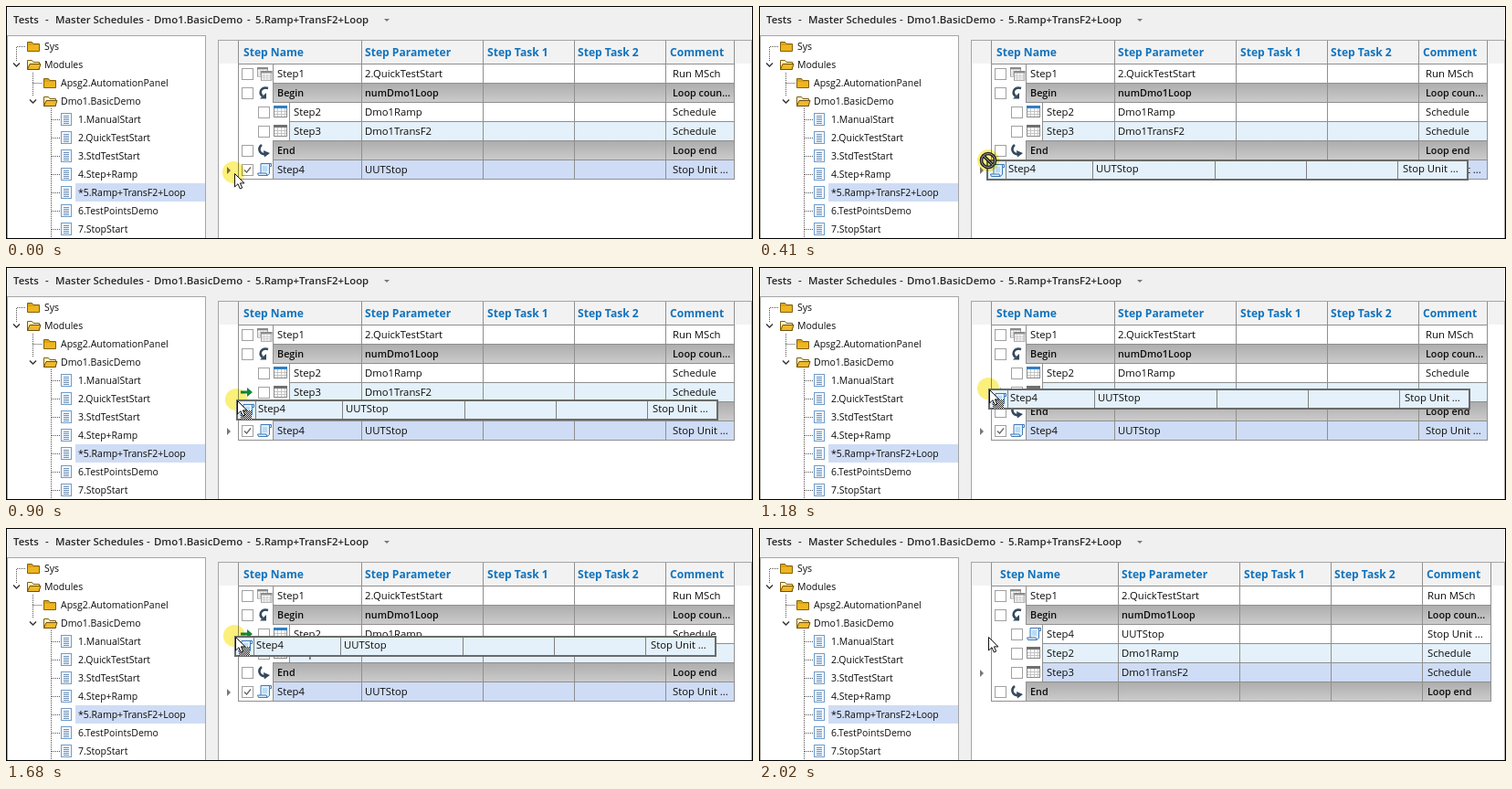
Recreate the animation shown at these times as an HTML page. Size 818 by 255 pixels, loop 3270 ms.

```html
<!DOCTYPE html>
<html lang="en">
<head>
<meta charset="utf-8">
<title>Reorder schedule steps</title>
<style>
html, body { margin: 0; width: 100%; height: 100%; overflow: hidden; background: #f0f0f0; }
svg { display: block; width: 818px; height: 255px; }
text { font: 11.3px "Open Sans", "Noto Sans", sans-serif; fill: #0c0c0c; white-space: pre; }
.tree { font-size: 10.5px; }
.title { font-size: 11.4px; font-weight: 600; fill: #262626; }
.head { font-size: 12.1px; font-weight: 700; fill: #1273bd; }
.loop { font-size: 10.8px; font-weight: 600; }
</style>
</head>
<body>
<svg id="stage" viewBox="0 0 818 255" xmlns="http://www.w3.org/2000/svg"></svg>
<script>
const LOOP = 3270;
const LINE = '#8f8f8f', ALT = '#e4f1fa', PICK = '#cfdcf5';

const box = (x, y, w, h, fill, extra = '') =>
  `<rect x="${x}" y="${y}" width="${w}" height="${h}" fill="${fill}" ${extra}/>`;
const frame = (x, y, w, h, fill, stroke) =>
  box(x + .5, y + .5, w - 1, h - 1, fill, `stroke="${stroke}"`);
const path = (d, fill, stroke = 'none', width = 1, extra = '') =>
  `<path d="${d}" fill="${fill}" stroke="${stroke}" stroke-width="${width}" ${extra}/>`;
const dots = d => path(d, 'none', '#555', 1, 'stroke-dasharray="1 1"');
const text = (x, y, s, cls = '') => `<text x="${x}" y="${y}" class="${cls}">${s}</text>`;
const at = (x, y, body) => `<g transform="translate(${x} ${y})">${body}</g>`;
const group = (id, body) => `<g id="${id}">${body}</g>`;

// Icons, each with its origin at the top left
function folder(open) {
  const back = path('M.5 11.5V1.5H5.5L7 3.5H13.5V11.5Z', open ? '#fff3c4' : '#dda412', '#80600f');
  return back + (open
    ? path('M.5 11.5L3 5.5H15L13 11.5Z', '#efb92a', '#6f500f')
    : path('M1 5H13V11H1Z', '#eeb51f'));
}

function page() {
  let s = frame(0, 0, 12, 14, '#f7fbff', '#6f9bc9');
  for (let y = 3; y < 12; y += 2) s += box(3, y, 6, 1, '#6d8fb4');
  return s;
}

function sheet(color) {
  let s = frame(0, 0, 15, 13, '#fff', '#8a8a8a') + box(0, 0, 15, 3, color);
  for (let x = 4; x < 14; x += 4) s += box(x, 3, 1, 9, '#c4c4c4');
  for (let y = 6; y < 12; y += 3) s += box(1, y, 13, 1, '#c4c4c4');
  return s;
}

const icons = {
  stack: () => `<g transform="scale(.8)">${sheet('#8a8a8a')}</g>` +
    at(4, 4, `<g transform="scale(.82)">${sheet('#8a8a8a')}</g>`),
  sheet: fill => sheet(fill === '#fff' ? '#2f7fc4' : '#707070'),
  begin: () => path('M12 2C5 0 1 6 6 11', 'none', '#34495e', 2.6) + path('M3 13.5H10V7Z', '#34495e'),
  end: () => path('M5 1C0 5 3 12 9 11', 'none', '#34495e', 2.6) + path('M7 7L14 10L8 14.5Z', '#34495e'),
  script: () => path('M4 .5H15.5V3.5H13.5V11.5L11 13.5H1.5L.5 11H4Z', '#e2f0fd', '#3f78b5') +
    path('M4 11H10L11 13.5M13.5 3.5V.5', 'none', '#3f78b5') + box(6, 3, 5, 6, '#b9dbf6')
};

const check = (x, y, on) => frame(x, y, 13, 13, '#fff', '#a0a0a0') +
  (on ? path(`M${x + 3} ${y + 6.5}L${x + 5.5} ${y + 9}L${x + 10} ${y + 3.5}`, 'none', '#666', 1.3) : '');

// Tree panel
function tree() {
  let s = frame(1, 32, 218, 224, '#fff', '#a5a5a5') + box(76, 194, 142, 20, PICK);
  s += dots('M11.5 60V44.5H22M29.5 98V72M29.5 84.5H40M49.5 112V255');
  const chevron = (x, y) => path(`M${x} ${y - 1.5}L${x + 3.5} ${y + 2}L${x + 7} ${y - 1.5}`, 'none', '#333', 1.4);
  const dirs = [['Sys', 23, 0], ['Modules', 23, 1], ['Apsg2.AutomationPanel', 41, 0], ['Dmo1.BasicDemo', 41, 1]];
  dirs.forEach(([name, x, open], i) => {
    const y = 44 + 20 * i;
    s += at(x, y - 6, folder(open)) + text(x + 19, y + 4, name, 'tree');
    if (open) s += chevron(x - 15, y);
  });
  const files = ['1.ManualStart', '2.QuickTestStart', '3.StdTestStart', '4.Step+Ramp',
    '*5.Ramp+TransF2+Loop', '6.TestPointsDemo', '7.StopStart'];
  files.forEach((name, i) => {
    const y = 124 + 20 * i;
    s += dots(`M50 ${y + .5}H59`) + at(60, y - 7, page()) + text(79, y + 4, name, 'tree');
  });
  return s;
}

function title() {
  const parts = [[8, 'Tests'], [43, '-'], [54, 'Master Schedules'], [154, '-'],
    [162, 'Dmo1.BasicDemo'], [264, '-'], [273, '5.Ramp+TransF2+Loop']];
  return parts.map(([x, s]) => text(x, 18.5, s, 'title')).join('') + path('M414 14H420L417 17Z', '#777');
}

// Step grid
const steps = {
  s1: { name: 'Step1', param: '2.QuickTestStart', note: 'Run MSch', icon: 'stack', level: 0 },
  begin: { name: 'Begin', param: 'numDmo1Loop', note: 'Loop coun...', icon: 'begin', level: 0, loop: true },
  s2: { name: 'Step2', param: 'Dmo1Ramp', note: 'Schedule', icon: 'sheet', level: 1 },
  s3: { name: 'Step3', param: 'Dmo1TransF2', note: 'Schedule', icon: 'sheet', level: 1 },
  end: { name: 'End', param: '', note: 'Loop end', icon: 'end', level: 0, loop: true },
  s4: { name: 'Step4', param: 'UUTStop', note: 'Stop Unit ...', icon: 'script', level: 0 }
};
const before = ['s1', 'begin', 's2', 's3', 'end', 's4'];
const after = ['s1', 'begin', 's4', 's2', 's3', 'end'];
const headings = [['Step Name', 260], ['Step Parameter', 393], ['Step Task 1', 527],
  ['Step Task 2', 626], ['Comment', 727]];

// shift: how far the widened first column pushes the others
function table(order, shift, picked) {
  const right = 797 + shift;
  let s = headings.map(([h, x]) => text(x + shift, 55, h, 'head')).join('');
  order.forEach((key, i) => {
    const step = steps[key], y = 64 + 21 * i;
    const nested = step.level || (order === after && key === 's4');
    const dx = nested ? 18 : 0, left = 292 + dx;
    const fill = step.loop ? 'url(#steel)' : i === picked ? PICK : i === 3 ? ALT : '#fff';
    const cls = step.loop ? 'loop' : '';
    s += box(left, y, right - left, 20, fill);
    s += box(left, y - 1, right - left, 1, LINE) + box(left, y + 20, right - left, 1, LINE);
    s += box(left, y, 1, 20, LINE);
    s += check(258 + dx, y + 4, order === before && key === 's4');
    s += at(275 + dx, y + 3, icons[step.icon](fill));
    s += text(nested ? 315 : 297, y + 14, step.name, cls);
    s += text(393 + shift, y + 14, step.param, cls) + text(730 + shift / 2, y + 14, step.note, cls);
    if (i === picked) s += path(`M242 ${y + 7}V${y + 15}L246 ${y + 11}Z`, '#777');
  });
  [389, 522, 622, 722, 797].forEach(x => { s += box(x + shift, 38, 1, 152, LINE); });
  return s + box(255, 63, right - 255, 1, LINE) + box(255, 189, right - 255, 1, LINE);
}

function ghost() {
  let s = box(1, 1, 526, 21, ALT, 'stroke="#6a6a6a" stroke-width="2"');
  [21, 116, 250, 350, 450].forEach(x => { s += box(x, 2, 1, 19, '#808080'); });
  s += at(4, 5, icons.script());
  return s + text(24, 14, 'Step4') + text(120, 14, 'UUTStop') + text(456, 14, 'Stop Unit ...');
}

const arrow = path('M.5 .5V15L4 11.7L6.3 17L8.7 16L6.4 10.9H11Z', '#fff', '#111');
const parcel = box(4, 11, 12, 10, 'url(#mesh)');
const barred = '<circle r="7.5" fill="none" stroke="#222" stroke-width="3.6"/>' +
  path('M-5 -5L5 5', 'none', '#222', 3.6) +
  '<circle r="7.5" fill="none" stroke="#999" stroke-width="1"/>' + path('M-5 -5L5 5', 'none', '#999', 1);
const disc = '<circle r="12" fill="#fbf07a" style="mix-blend-mode:multiply"/>';

const stage = document.getElementById('stage');
stage.innerHTML =
  '<defs><linearGradient id="steel" x2="0" y2="1"><stop stop-color="#adadad"/>' +
  '<stop offset="1" stop-color="#cbcbcb"/></linearGradient>' +
  '<pattern id="mesh" width="2" height="2" patternUnits="userSpaceOnUse">' +
  box(0, 0, 2, 2, '#fff') + box(0, 0, 1, 1, '#111') + box(1, 1, 1, 1, '#111') + '</pattern></defs>' +
  box(0, 0, 818, 255, '#f0f0f0') + title() + tree() +
  frame(232, 37, 585, 220, '#fff', '#a5a5a5') + box(233, 38, 583, 25, '#f2f2f2') +
  box(254, 38, 1, 152, LINE) +
  group('old', table(before, 0, 5)) +
  group('moved', table(after, 0, 4)) +
  group('done', table(after, 4, 4)) +
  group('drop', path('M0 -1.5H7V-5L13 0L7 5V1.5H0Z', '#12873a')) +
  group('halo', disc) + group('ghost', ghost()) + group('ban', disc + barred) +
  group('mouse', group('parcel', parcel) + arrow) +
  frame(0, 0, 818, 255, 'none', '#000');

const parts = Object.fromEntries(
  ['old', 'moved', 'done', 'drop', 'halo', 'ghost', 'ban', 'mouse', 'parcel']
    .map(id => [id, document.getElementById(id)]));
const show = (id, on) => parts[id].setAttribute('display', on ? 'inline' : 'none');
const move = (id, x, y) => parts[id].setAttribute('transform', `translate(${x} ${y})`);

// Drag path: time, x, y
const track = [[270, 248, 177], [620, 251, 156], [760, 252, 151], [900, 252, 146],
  [1180, 251, 134], [1330, 251, 129], [1680, 250, 119]];

// The pointer is sampled every 70 ms, with one longer step before 1260
function tick(t) {
  const start = t < 1260 ? 270 : 1260;
  const q = start + 70 * Math.floor((t - start) / 70);
  return Math.min(q, t < 1260 ? 1180 : 1680);
}

function pointer(t) {
  if (t < 270) return [249, 183];
  const q = tick(t);
  const i = Math.max(1, track.findIndex(k => k[0] >= q));
  const a = track[i - 1], b = track[i], f = (q - a[0]) / (b[0] - a[0]);
  return [1, 2].map(n => Math.round(a[n] + (b[n] - a[n]) * f));
}

function render(t) {
  const [x, y] = pointer(t);
  const drag = t >= 270 && t < 1950, allowed = y < 169;
  show('old', t < 1950);
  show('moved', t >= 1950 && t < 2020);
  show('done', t >= 2020);
  show('ghost', drag);
  show('ban', drag && !allowed);
  show('halo', t < 2020 && (!drag || allowed));
  show('mouse', !drag || allowed);
  show('parcel', drag);
  show('drop', drag && allowed);
  const row = Math.floor((y - 64) / 21);
  move('drop', row === 2 || row === 3 ? 257 : 239, 74 + 21 * row);
  move('ghost', x, y - 1);
  move('ban', x + 2, y);
  move('halo', x, y - 1);
  move('mouse', x + 1, y);
}

const t0 = performance.now();
function loop() {
  render((performance.now() - t0) % LOOP);
  requestAnimationFrame(loop);
}
loop();
</script>
</body>
</html>
```
